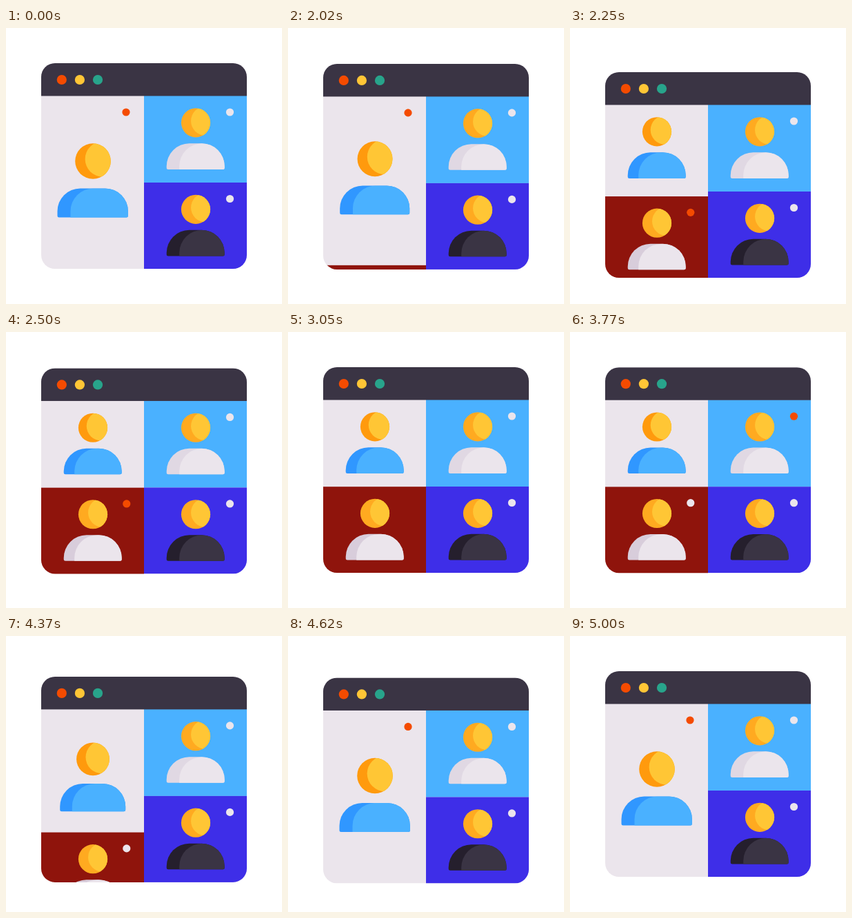
Recreate the animation shown at these times as an HTML page with a canvas. Size 400 by 400 pixels, loop 5.02 s.

```html
<!DOCTYPE html>
<html>
<head>
<meta charset="utf-8">
<title>Video call</title>
<style>
html, body { margin: 0; height: 100%; overflow: hidden; background: #fff; }
canvas { display: block; width: 400px; height: 400px; }
</style>
</head>
<body>
<canvas></canvas>
<script>
const LOOP = 5020, OPEN = 1975, CLOSE = 4225;
const ORANGE = '#f44b00', PALE = '#ebe5ec', DARK = '#3a3444', SKY = '#4ab1ff';
const canvas = document.querySelector('canvas');
const c = canvas.getContext('2d');
const ratio = window.devicePixelRatio || 1;
canvas.width = canvas.height = 400 * ratio;

const clamp = x => Math.max(0, Math.min(1, x));
const lerp = (a, b, k) => a + (b - a) * k;
const ease = x => Math.sin(clamp(x) * Math.PI / 2) ** 2;

// 0 with the tile hidden, 1 with it fully raised
const raised = (t, span) => ease((t - OPEN) / span) - ease((t - CLOSE) / span);
const bump = (t, start, rise, fall) => ease((t - start) / rise) - ease((t - start - rise) / fall);
const shown = (t, from, to) => clamp((t - from) / 80) * clamp((to - t) / 80);

function rect(x, y, w, h, color) {
  c.fillStyle = color;
  c.fillRect(x, y, w, h);
}

function disc(x, y, r, color) {
  c.fillStyle = color;
  c.beginPath();
  c.arc(x, y, r, 0, Math.PI * 2);
  c.fill();
}

function dot(x, y, color, size) {
  if (size > 0) disc(x, y, 5.6 * size, color);
}

function shoulders(left, right, top, h, color) {
  const r = 33;
  c.fillStyle = color;
  c.beginPath();
  c.roundRect(left, top, right - left, h, [r, r, 2.5, 2.5]);
  c.fill();
}

function person(p) {
  const { x, y, r, half, top, h, fold, turn, face, body, shade } = p;
  disc(x, y, r, face);
  c.save();
  c.beginPath();
  c.arc(x, y, r, 0, Math.PI * 2);
  c.clip();
  disc(x + r * turn, y - r * 0.12, r, '#ffc635');
  c.restore();

  const mid = x - 0.3, left = mid - half, right = mid + half;
  shoulders(left, right, top, h, shade);
  c.save();
  c.beginPath();
  c.roundRect(left, top, half * 2, h, [33, 33, 2.5, 2.5]);
  c.clip();
  c.fillStyle = body;
  c.beginPath();
  c.roundRect(left + fold, top, half * 2, h + 5, [33, 0, 0, 0]);
  c.fill();
  c.restore();
}

const small = (x, y, fold, body, shade) => person({
  x, y, r: 21.1, half: 42, top: y + 30, h: 37.6, fold, turn: 0.67,
  face: '#ffaa20', body, shade
});

function draw(t) {
  const moving = t >= 2020 && t < 5000;
  const tile = moving ? raised(t, 325) : 0;
  const k = moving ? raised(t, 260) : 0;
  const drop = moving
    ? bump(t, OPEN, 270, 327) * 13 + bump(t, 3080, 260, 280) * 4
      + bump(t, 3740, 210, 240) * 4 + bump(t, CLOSE, 270, 327) * 14
    : 0;

  c.setTransform(ratio, 0, 0, ratio, 0, 0);
  rect(0, 0, 400, 400, '#fff');
  c.translate(0, drop);
  c.save();
  c.beginPath();
  c.roundRect(51, 51, 298, 298, 20);
  c.clip();

  rect(51, 51, 298, 298, PALE);
  rect(200, 98, 149, 126, SKY);
  rect(200, 224, 149, 125, '#3e2ee8');
  rect(51, 51, 298, 47.5, DARK);
  [ORANGE, '#ffc636', '#28a48b'].forEach((color, i) => disc(80.8 + i * 26.1, 75, 7.1, color));

  person({
    x: 126, y: lerp(193, 137.3, k), r: lerp(25.8, 21.1, k),
    half: lerp(51.2, 42, k), top: lerp(232.5, 167.3, k), h: lerp(42, 37.6, k),
    fold: lerp(19, 15.5, k), turn: 0.56, face: '#ff9a0d', body: SKY, shade: '#3097ff'
  });
  dot(174, 122, ORANGE, Math.max(clamp((2150 - t) / 80), clamp((t - 4540) / 80)));

  small(275, 137.3, 18.5, PALE, '#e0d8e3');
  small(275, 262.8, 18.5, DARK, '#251f2d');
  dot(324.5, 122, PALE, Math.max(clamp((3200 - t) / 80), clamp((t - 3950) / 80)));
  dot(324.5, 122, ORANGE, shown(t, 3200, 3950));
  dot(324.5, 247.5, PALE, 1);

  if (tile > 0) {
    const top = lerp(349, 224.2, tile);
    rect(51, top, 149, 126, '#8f140c');
    small(126, top + 38.6, 15.5, PALE, '#d8cddb');
    dot(174.8, top + 23.3, ORANGE, clamp((3040 - t) / 80));
    dot(174.8, top + 23.3, PALE, clamp((t - 3070) / 80));
  }
  c.restore();
}

const start = performance.now();
function frame() {
  draw((performance.now() - start) % LOOP);
  requestAnimationFrame(frame);
}
frame();
</script>
</body>
</html>
```
